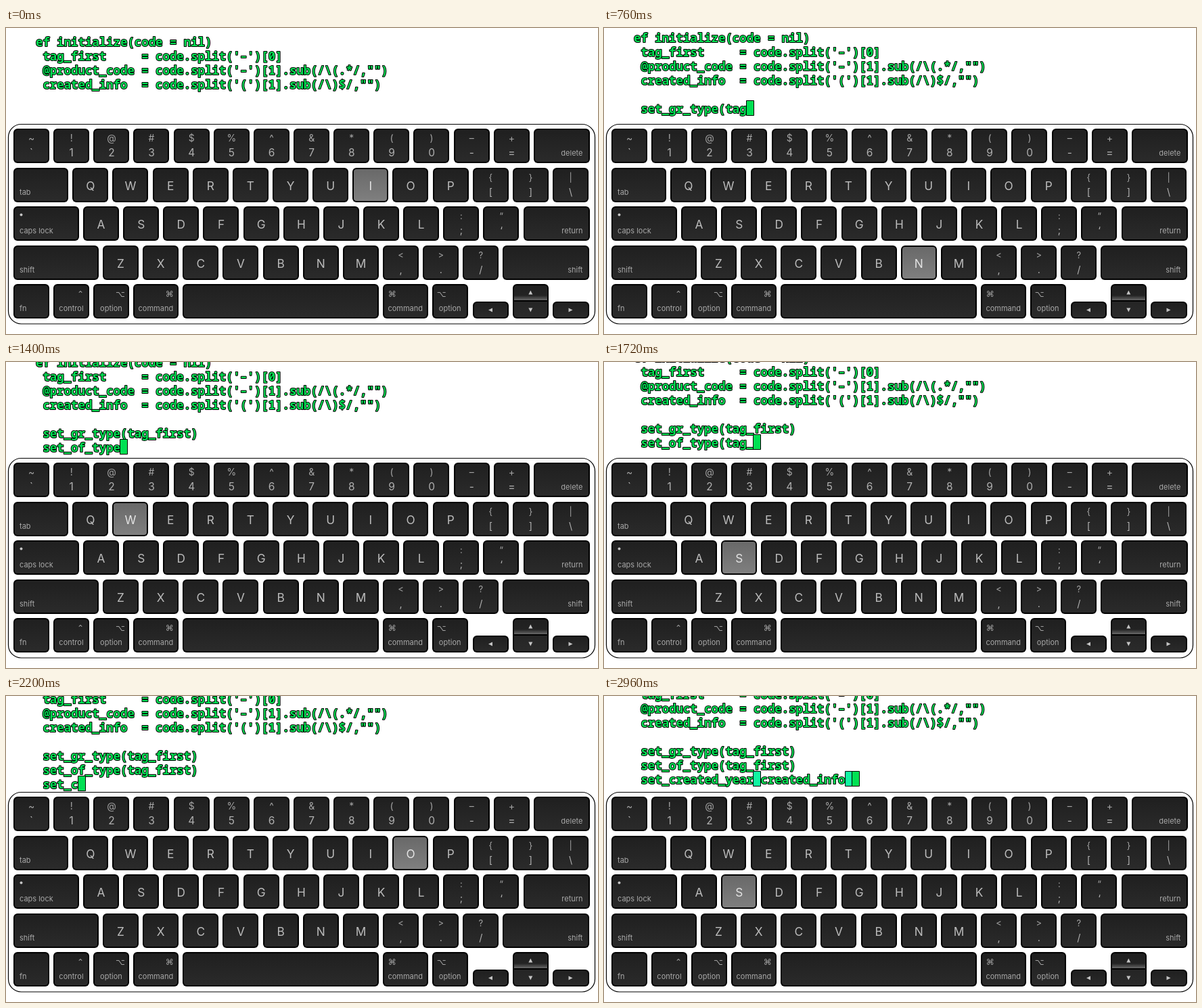
Animation of 875x453 px, one loop 3000 ms. Source, as an HTML page with a canvas:

```html
<!DOCTYPE html>
<html>
<head>
<meta charset="utf-8">
<style>
html, body { margin: 0; width: 100%; height: 100%; overflow: hidden; background: #fff; }
canvas { display: block; }
</style>
</head>
<body>
<canvas id="stage" width="875" height="453"></canvas>
<script>
const g = document.getElementById('stage').getContext('2d');
const LOOP = 3000, COL = 10.42, LINE = 21;
const KEY_W = 53.2, KEY_H = 51, GAP = 5.95;
const SANS = 'Inter, Roboto, sans-serif', MONO = '"Noto Sans Mono", "DejaVu Sans Mono", monospace';
const SYMBOLS = '"DejaVu Sans", sans-serif';
const GREEN = '#00e053', MATCH = '#12f5a2';

const intro = [
  'ef initialize(code = nil)',
  " tag_first     = code.split('–')[0]",
  " @product_code = code.split('–')[1].sub(/\\(.*/,\"\")",
  " created_info  = code.split('(')[1].sub(/\\)$/,\"\")"
];
// Each typed line has [time, characters] points.
const typed = [
  { text: 'set_gr_type(tag_first)', keys: [[160, 0], [490, 7.3], [960, 22]] },
  { text: 'set_of_type(tag_first)', keys: [[1040, 0], [1400, 11.2], [1720, 16.2], [1960, 22]] },
  { text: 'set_created_year(created_info)', keys: [[2040, 0], [2200, 5.2], [2900, 30], [LOOP, 30]] }
];
const phrase = 'I KNOW SPORTS';

// A key is its label, or [label, width, align, mark, mark side]; two characters stack.
const rows = [
  [149, ['~`', '!1', '@2', '#3', '$4', '%5', '^6', '&7', '*8', '(9', ')0', '–-', '+=', ['delete', 82.5, 'right']]],
  [207, [['tab', 81.25, 'left'], ...'QWERTYUIOP', '{[', '}]', '|\\']],
  [264, [['caps lock', 97, 'left'], ...'ASDFGHJKL', ':;', '“‘', ['return', 98, 'right']]],
  [322, [['shift', 126, 'left'], ...'ZXCVBNM', '<,', '>.', '?/', ['shift', 128, 'right']]],
  [379, [['fn', 53, 'left'], ['control', 53, 'center', '⌃', 1], ['option', 53, 'center', '⌥', 1],
    ['command', 67, 'center', '⌘', 1], ['', 290, 'center'], ['command', 67, 'center', '⌘', -1],
    ['option', 53, 'center', '⌥', -1]]]
];

function box(x, y, w, h, r) {
  g.beginPath();
  g.roundRect(x, y, w, h, r);
}

function label(text, x, y, size, color, align = 'center', family = SANS) {
  g.font = size + 'px ' + family;
  g.fillStyle = color;
  g.textAlign = align;
  g.fillText(text, x, y);
}

function cap(left, y, width, h, lit) {
  const x = Math.round(left), w = Math.round(width);
  box(x, y, w, h, 6);
  g.fillStyle = '#000';
  g.fill();
  const shade = g.createLinearGradient(0, y, 0, y + h);
  shade.addColorStop(0, lit ? '#686868' : '#1f1f1f');
  shade.addColorStop(1, lit ? '#808080' : '#2b2b2b');
  box(x + 2, y + 2, w - 4, h - 4, 4);
  g.fillStyle = shade;
  g.fill();
}

function drawKey(text, w, align, mark, side, x, y, lit) {
  cap(x, y, w, KEY_H, lit);
  const mid = x + w / 2;
  if (!align) {
    if (text.length === 1) label(text, mid, y + 32.5, 17.3, lit ? '#e4e4e4' : '#bcbcbc');
    else {
      const size = y === 149 ? 15.5 : 14.5;
      label(text[0], mid, y + 19, size - 1.5, '#a4a4a4');
      label(text[1], mid, y + 40.5, size, '#b0b0b0');
    }
    return;
  }
  const at = { left: x + 9, right: x + w - 10, center: mid }[align];
  label(text, at, y + 39.5, 11, '#a8a8a8', align);
  if (mark) label(mark, side > 0 ? x + w - 13 : x + 14, y + 19, 12, '#a4a4a4', 'center', SYMBOLS);
}

function triangle(x, y, turn) {
  g.save();
  g.translate(x, y);
  g.rotate(turn * Math.PI / 2);
  g.beginPath();
  g.moveTo(0, -3);
  g.lineTo(3, 3);
  g.lineTo(-3, 3);
  g.fillStyle = '#c4c4c4';
  g.fill();
  g.restore();
}

function drawArrows() {
  cap(689.5, 405, KEY_W, 25);
  cap(748.7, 379, KEY_W, KEY_H);
  cap(808, 405, 53.5, 25);
  const shine = g.createLinearGradient(0, 396, 0, 403);
  shine.addColorStop(0, '#242424');
  shine.addColorStop(1, '#686868');
  g.fillStyle = shine;
  g.fillRect(751, 396, 49, 7);
  g.fillStyle = '#000';
  g.fillRect(751, 403, 49, 2);
  triangle(716, 417.5, -1);
  triangle(775.3, 391.5, 0);
  triangle(775.3, 417.5, 2);
  triangle(834.5, 417.5, 1);
}

function drawKeyboard(pressed) {
  box(3.5, 142.5, 867, 295.5, 19);
  g.fillStyle = '#fff';
  g.fill();
  g.strokeStyle = '#000';
  g.lineWidth = 1.2;
  g.stroke();
  for (const [y, keys] of rows) {
    let x = 11;
    for (const key of keys) {
      const [text, w, align, mark, side] = Array.isArray(key) ? key : [key, KEY_W];
      drawKey(text, w, align, mark, side, x, y, text === pressed);
      x += w + GAP;
    }
  }
  g.beginPath();
  g.arc(22.5, 276.5, 2, 0, 7);
  g.fillStyle = '#c4c4c4';
  g.fill();
  drawArrows();
}

function drawCode(text, x, y) {
  g.font = '600 17.37px ' + MONO;
  g.textAlign = 'left';
  g.lineJoin = 'round';
  g.lineWidth = 2;
  g.strokeStyle = '#000';
  g.fillStyle = GREEN;
  g.strokeText(text, x, y);
  g.fillText(text, x, y);
}

function block(x, y, color) {
  const left = Math.round(x) - 0.5, top = Math.round(y) - 18.5;
  g.fillStyle = color;
  g.fillRect(left, top, 11, 22);
  g.strokeStyle = '#000';
  g.lineWidth = 1;
  g.strokeRect(left, top, 11, 22);
}

function countAt(keys, t) {
  for (let i = 1; i < keys.length; i++) {
    const [t0, n0] = keys[i - 1], [t1, n1] = keys[i];
    if (t < t1) return Math.floor(n0 + (n1 - n0) * (t - t0) / (t1 - t0));
  }
  return keys[keys.length - 1][1];
}

function drawTyped({ text, keys }, y, t) {
  if (t < keys[0][0]) return;
  const n = countAt(keys, t), x = 44 + COL;
  drawCode(text.slice(0, n), x, y);
  if (t >= keys[keys.length - 1][0]) return;
  if (n === text.length) {
    block(x + text.indexOf('(') * COL, y, MATCH);
    block(x + (n - 1) * COL, y, MATCH);
  }
  block(x + n * COL, y, GREEN);
}

function draw(now) {
  const t = now % LOOP;
  const top = 27.5 - 22.5 * (1 - Math.cos(Math.PI * t / LOOP));
  g.fillStyle = '#fff';
  g.fillRect(0, 0, 875, 453);
  intro.forEach((text, i) => drawCode(text, 44, top + i * LINE));
  typed.forEach((line, i) => drawTyped(line, top + (i + 5) * LINE, t));
  drawKeyboard(phrase[Math.max(0, Math.floor((t - 14) / 232))]);
}

const start = performance.now();
function tick() {
  draw(performance.now() - start);
  requestAnimationFrame(tick);
}
tick();
</script>
</body>
</html>
```
